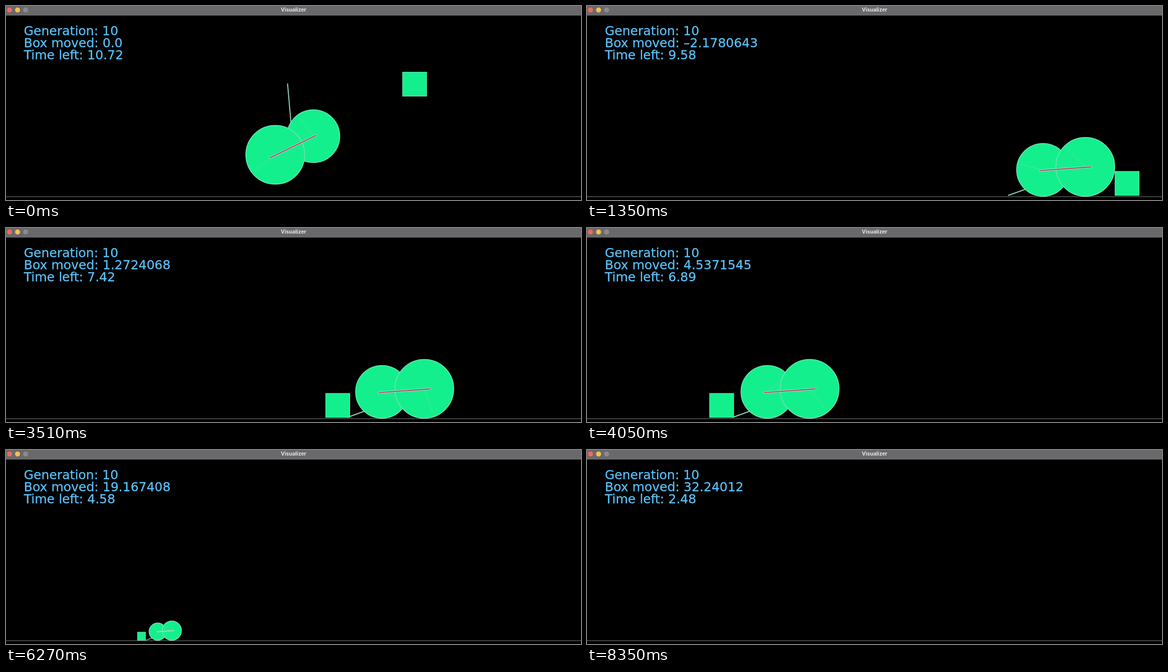
An HTML page with a canvas that plays this animation: 1143 px wide and 386 px high, repeating every 8370 ms.

```html
<!DOCTYPE html>
<html lang="en">
<head>
<meta charset="utf-8">
<title>Visualizer</title>
<style>
html, body { margin: 0; width: 100%; height: 100%; overflow: hidden; background: #000; }
canvas { position: absolute; left: 0; top: 0; }
.bar {
  position: absolute; left: 0; top: 0; width: 1143px; height: 19px; background: #69696b;
  font: bold 10.4px/15px Inter, "Liberation Sans", sans-serif; color: #e4e4e5; text-align: center;
}
.dot { position: absolute; top: 3px; width: 10px; height: 10px; border-radius: 50%; }
.hud {
  position: absolute; left: 35.5px; top: 38px; margin: 0; color: #5bc2f9;
  font: 25px/24px "DejaVu Sans", sans-serif; white-space: pre;
  -webkit-text-stroke: 0.3px #5bc2f9;
}
</style>
</head>
<body>
<canvas id="view" width="1143" height="386"></canvas>
<div class="bar">Visualizer
  <i class="dot" style="left:2px;background:#ed6a5e"></i>
  <i class="dot" style="left:18px;background:#f5c04f"></i>
  <i class="dot" style="left:34px;background:#8b8b8d"></i>
</div>
<div class="hud" id="hud"></div>
<script>
const LOOP = 8370, START = 240, FLIP = 660, ZOOM_AT = 4350;
const UNIT = 120, BOX_X = 812.2, HALF = 24, GROUND = 379, BOX_TOP = 329;
const BIG = 59, SMALL = 53, AXLE = 84.3, TAIL = 126;
const GREEN = '#14ef8d', EDGE = '#74e3b4', PALE = '#a9d8c4';
const RAD = Math.PI / 180;

const ctx = document.getElementById('view').getContext('2d');
const hud = document.getElementById('hud');

// Smooth curve through [time, value] points that never overshoots.
function curve(...pts) {
  const slope = i => (pts[i + 1][1] - pts[i][1]) / (pts[i + 1][0] - pts[i][0]);
  const tangent = i => {
    if (i === 0) return slope(0);
    if (i === pts.length - 1) return slope(i - 1);
    const a = slope(i - 1), b = slope(i);
    return a * b > 0 ? 2 * a * b / (a + b) : 0;
  };
  return t => {
    let i = 0;
    while (i < pts.length - 2 && t >= pts[i + 1][0]) i++;
    const [t0, a] = pts[i], [t1, b] = pts[i + 1], h = t1 - t0;
    const u = Math.min(1, Math.max(0, (t - t0) / h)), v = 1 - u;
    return a * (1 + 2 * u) * v * v + b * u * u * (3 - 2 * u)
      + h * (tangent(i) * u * v * v - tangent(i + 1) * u * u * v);
  };
}

const timeLeft = curve([START, 10.72], [1350, 9.58], [2810, 8.08], [3510, 7.42],
  [4710, 6.23], [6270, 4.58], [8350, 2.48]);
const moved = curve([START, 0], [740, 0], [1350, -2.1780643], [1560, -2.45],
  [2050, -1.8380883], [2920, -1.8380883], [3510, 1.2724068], [ZOOM_AT, 6.43],
  [4710, 8.751625], [6270, 19.167408], [8350, 32.24012]);
// Distance of the big wheel from the box: push it, climb over, come back.
const lead = curve([START, -277], [740, -83], [1500, -83], [2050, 210], [2450, 338],
  [2810, 239], [2920, 172], [3510, 172], [4710, 181]);

// Refreshes come about every 60 ms, in batches with these bounds.
const BATCHES = [300, 1180, 2050, 2930, 3810, 4650, 5530, 6390, 7250, 8140, 8405];
function tick(t) {
  if (t < BATCHES[0]) return START;
  const b = BATCHES.findLastIndex(start => start <= t);
  const gap = BATCHES[b + 1] - BATCHES[b], steps = Math.ceil(gap / 60);
  const at = i => 10 * Math.floor((BATCHES[b] + i * gap / steps) / 10 + 0.15);
  let i = steps - 1;
  while (at(i) > t) i--;
  return at(i);
}

const fall = t => { const s = (t - START) / 1000; return 336 * s + 600 * s * s; };
const flipped = t => { const u = Math.min(1, (t - START) / FLIP); return u * u * (3 - 2 * u); };

// Height of a wheel's centre when it rests on the ground or on the box.
function rest(x, r, boxX) {
  const d = Math.max(0, Math.abs(x - boxX) - HALF);
  return d < r ? Math.min(GROUND - r, BOX_TOP - Math.sqrt(r * r - d * d)) : GROUND - r;
}

function pose(t) {
  const m = moved(t), p = flipped(t);
  const box = { x: BOX_X - UNIT * m, y: Math.min(353, 155.5 + fall(t)) };
  const big = { x: box.x + lead(t) }, small = {};
  if (p < 1) {
    const a = (-26 - 158 * p) * RAD;
    big.y = Math.min(GROUND - BIG, 296 + fall(t));
    small.x = big.x + AXLE * Math.cos(a);
    small.y = Math.min(GROUND - SMALL, big.y + AXLE * Math.sin(a));
  } else {
    big.y = rest(big.x, BIG, box.x);
    small.x = big.x - AXLE;
    for (let i = 0; i < 3; i++) {
      small.y = rest(small.x, SMALL, box.x);
      small.x = big.x - Math.sqrt(AXLE ** 2 - (small.y - big.y) ** 2);
    }
  }
  return { m, p, box, big, small };
}

function line(x0, y0, x1, y1, color, width) {
  ctx.beginPath();
  ctx.moveTo(x0, y0);
  ctx.lineTo(x1, y1);
  ctx.strokeStyle = color;
  ctx.lineWidth = width;
  ctx.stroke();
}

// The spoke turns as the wheel rolls.
function wheel({ x, y }, r, phase, px) {
  ctx.beginPath();
  ctx.arc(x, y, r - 0.5 * px, 0, 2 * Math.PI);
  ctx.fillStyle = GREEN;
  ctx.fill();
  ctx.strokeStyle = EDGE;
  ctx.lineWidth = 1.5 * px;
  ctx.stroke();
  const spin = x / r + phase, len = 0.85 * r;
  line(x, y, x + len * Math.cos(spin), y + len * Math.sin(spin), 'rgba(130,215,175,.55)', px);
}

function draw(t) {
  const { m, p, box, big, small } = pose(t);
  const zoomed = t >= ZOOM_AT, px = zoomed ? 3 : 1;
  ctx.setTransform(1, 0, 0, 1, 0, 0);
  ctx.clearRect(0, 0, 1143, 386);
  ctx.fillStyle = '#787d74';
  ctx.fillRect(0, GROUND, 1143, 1);
  if (zoomed) ctx.setTransform(1 / 3, 0, 0, 1 / 3, 1036 - BOX_X / 3, GROUND * 2 / 3);

  const ux = (big.x - small.x) / AXLE, uy = (big.y - small.y) / AXLE;
  const x0 = small.x - 7.5 * ux, y0 = small.y - 7.5 * uy + 1;
  const x1 = big.x + 13 * ux, y1 = big.y + 13 * uy + 1;
  const cx = (x0 + x1) / 2, cy = (y0 + y1) / 2, a = (-95 - 110 * p) * RAD;
  line(cx, cy + 12 * p, cx + TAIL * Math.cos(a), Math.min(377, cy + TAIL * Math.sin(a)),
    '#8fd3b8', zoomed ? 4.2 : 2);

  wheel(small, SMALL, -1.16, px);
  wheel(big, BIG, -0.3, px);
  line(x0, y0, x1, y1, PALE, zoomed ? 6 : 4);
  if (!zoomed) line(x0 + ux, y0 + uy, x1 - ux, y1 - uy, '#a8315f', 1.6);

  ctx.fillStyle = GREEN;
  ctx.fillRect(box.x - HALF, box.y - HALF, 2 * HALF, 2 * HALF);
  ctx.strokeStyle = EDGE;
  ctx.lineWidth = px;
  ctx.strokeRect(box.x - HALF, box.y - HALF, 2 * HALF, 2 * HALF);

  const size = Math.abs(m), digits = size < 8 ? 7 : size < 32 ? 6 : 5;
  const shown = size < 1e-6 ? '0.0' : m.toFixed(digits).replace('-', '\u2013');
  hud.textContent = `Generation: 10\nBox moved: ${shown}\nTime left: ${timeLeft(t).toFixed(2)}`;
}

let begin = null;
function loop(now) {
  if (begin === null) begin = now;
  draw(tick((now - begin) % LOOP));
  requestAnimationFrame(loop);
}
draw(START);
requestAnimationFrame(loop);
</script>
</body>
</html>
```
